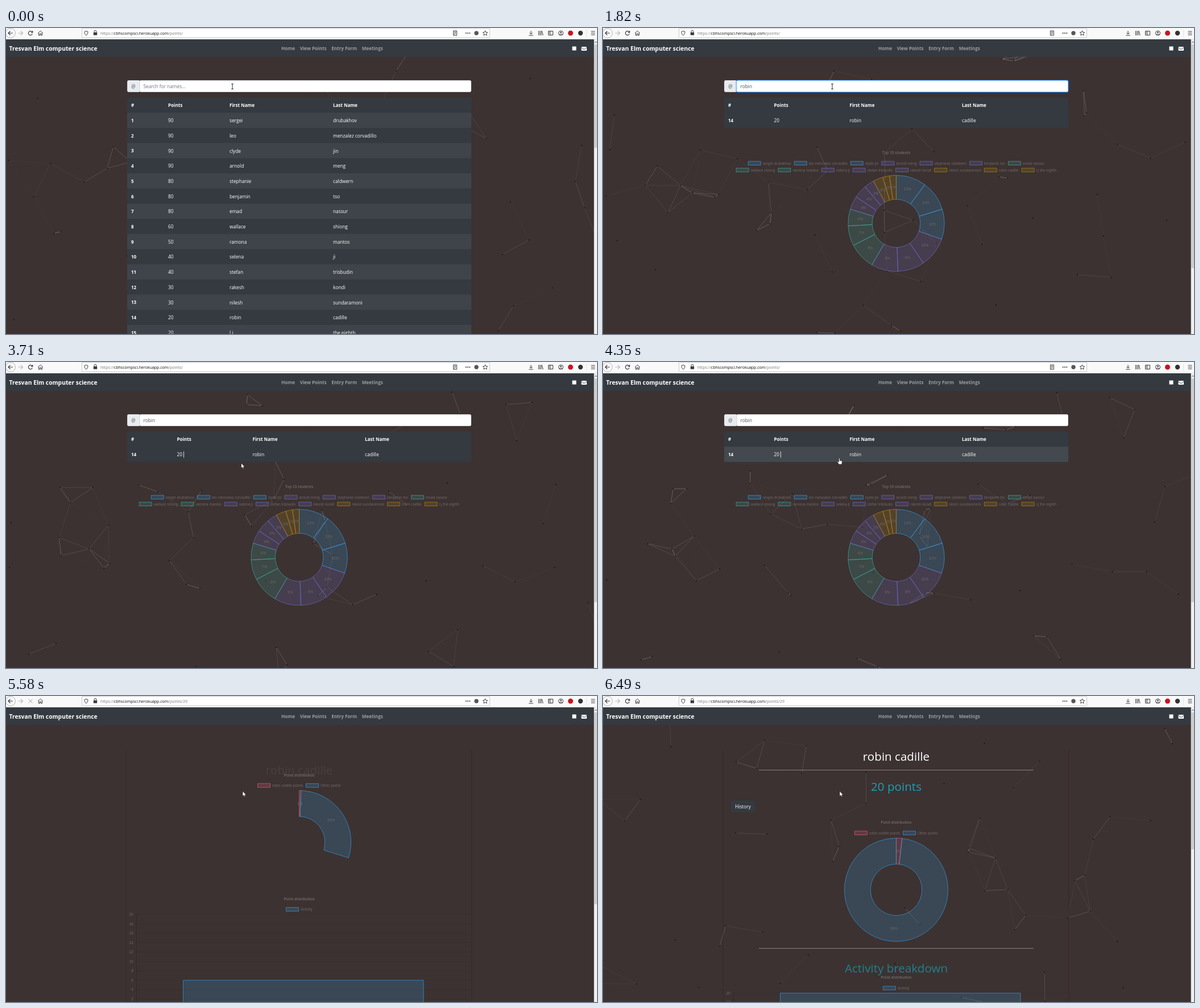
These frames come from a looping animation (1039 by 539 pixels, 6530 ms). An HTML page with a canvas:

```html
<!DOCTYPE html>
<html lang="en">
<head>
<meta charset="utf-8">
<title>Points</title>
<style>
html, body { margin: 0; width: 100%; height: 100%; overflow: hidden; background: #3c3231; }
canvas { display: block; }
</style>
</head>
<body>
<canvas id="stage" width="1039" height="539"></canvas>
<script>
const c = document.getElementById('stage').getContext('2d');
const LOOP = 6530, TYPE = 1110, KEY_GAP = 155, BLUR = 3400, CLICK = 5200, LOAD = 5470;
const UI = '"Open Sans", "Noto Sans", sans-serif', CHART = '"Liberation Sans", Arial, sans-serif';
const DARK = '#343a40', GREY = '#6b6664', INK = '#3a3a3d';
const BLUE = '54,155,225', PURPLE = '110,105,195', GREEN = '60,165,155', GOLD = '175,130,20', PINK = '230,90,120';

const people = `90 sergei drubakhov
90 leo menzalez corvadillo
90 clyde jin
90 arnold meng
80 stephanie caldwern
80 benjamin tso
80 emad nassur
60 wallace shiong
50 ramona mantos
40 selena ji
40 stefan trisbudin
30 rakesh kondi
30 nilesh sundaramoni
20 robin cadille
20 l.j the eighth`.split('\n').map((row, i) => {
  const [points, first, ...rest] = row.split(' ');
  return { id: i + 1, points: +points, first, last: rest.join(' ') };
});
const total = people.reduce((sum, p) => sum + p.points, 0);
const groups = [BLUE, PURPLE, GREEN, PURPLE, GOLD];
const shares = people.map((p, i) => [`${p.first} ${p.last}`, groups[Math.floor(i / 3)], p.points / total]);

const clamp = v => Math.max(0, Math.min(1, v));
const smooth = v => (v = clamp(v), v * v * (3 - 2 * v));
const mod = (a, n) => (a % n + n) % n;

// Drifting dots: start and speed in px per second
function scatter(count, seed) {
  const rand = () => (seed = seed * 16807 % 2147483647) / 2147483647;
  return Array.from({ length: count }, () => ({
    x: rand() * 1080, y: rand() * 535, vx: rand() * 90 - 45, vy: rand() * 90 - 45
  }));
}
const homeDots = scatter(68, 4021), profileDots = scatter(60, 917);

function rect(x, y, w, h, fill, stroke, r = 0) {
  c.beginPath();
  c.roundRect(x, y, w, h, r);
  if (fill) { c.fillStyle = fill; c.fill(); }
  if (stroke) { c.strokeStyle = stroke; c.stroke(); }
}
function disc(x, y, r, fill) {
  c.beginPath();
  c.arc(x, y, r, 0, 7);
  c.fillStyle = fill;
  c.fill();
}
function text(s, x, y, size, fill, { align = 'left', bold = false, font = UI } = {}) {
  c.font = `${bold ? 'bold ' : ''}${size}px ${font}`;
  c.textAlign = align;
  c.fillStyle = fill;
  c.fillText(s, x, y + size * 0.36);
  return c.measureText(s).width;
}
const label = (s, x, y, align = 'center', bold = false) => text(s, x, y, 6.54, GREY, { align, bold, font: CHART });
function icon(d, x, y, stroke = INK, width = 1, fill) {
  const path = new Path2D(d);
  c.save();
  c.translate(x, y);
  if (fill) { c.fillStyle = fill; c.fill(path); }
  c.strokeStyle = stroke;
  c.lineWidth = width;
  c.stroke(path);
  c.restore();
}

function web(dots, t) {
  const pts = dots.map(d => [mod(d.x + d.vx * t / 1000, 1080) - 20, mod(d.y + d.vy * t / 1000, 535) + 25]);
  c.lineWidth = 0.7;
  pts.forEach(([x, y], i) => {
    for (const [u, v] of pts.slice(i + 1)) {
      const d = Math.hypot(x - u, y - v);
      if (d > 82) continue;
      c.strokeStyle = `rgba(255,255,255,${0.45 * (1 - d / 82)})`;
      c.beginPath();
      c.moveTo(x, y);
      c.lineTo(u, v);
      c.stroke();
    }
  });
  for (const [x, y] of pts) disc(x, y, 1.2, 'rgba(25,20,20,.8)');
  c.lineWidth = 1;
}

function legend(items, y) {
  c.font = `6.54px ${CHART}`;
  const widths = items.map(([s]) => 25.5 + c.measureText(s).width);
  let x = 515.5 - (widths.reduce((a, b) => a + b, 0) + 5.5 * (items.length - 1)) / 2;
  items.forEach(([s, rgb], i) => {
    rect(x, y - 3.3, 22, 6.6, `rgba(${rgb},.2)`, `rgba(${rgb},.7)`);
    label(s, x + 25.5, y, 'left');
    x += widths[i] + 5.5;
  });
}

function ring(y, R, r, items, grow = 1) {
  const x = 515.5;
  let a = -Math.PI / 2;
  for (const [, rgb, part] of items) {
    const b = a + part * grow * 2 * Math.PI, m = (a + b) / 2;
    c.beginPath();
    c.arc(x, y, R, a, b);
    c.arc(x, y, r, b, a, true);
    c.closePath();
    c.fillStyle = `rgba(${rgb},.2)`;
    c.fill();
    c.strokeStyle = `rgba(${rgb},.7)`;
    c.stroke();
    label(Math.round(part * grow * 100) + '%', x + (R + r) / 2 * Math.cos(m), y + (R + r) / 2 * Math.sin(m));
    a = b;
  }
}

const typedAt = t => 'robin'.slice(0, Math.max(0, Math.ceil((t - TYPE) / KEY_GAP)));

function search(t) {
  const typed = typedAt(t), focus = clamp((t - 700) / 150) * clamp((BLUR + 150 - t) / 150);
  rect(213.5, 92.5, 22, 20, '#e9ecef', '#ced4da', 2);
  text('@', 224, 103, 8.3, '#495057', { align: 'center' });
  if (focus) rect(234, 91.6, 584.5, 21.8, null, `rgba(0,123,255,${0.6 * focus})`, 2);
  rect(235, 92.5, 582.5, 20, '#fff', focus > 0.5 ? '#80bdff' : '#ced4da', 2);
  const w = text(typed || 'Search for names...', 241.5, 103, 8.3, typed ? '#495057' : '#6c757d');
  if (focus && t < 2400 && mod(t - 1100, 1060) < 530) rect(242 + (typed ? w : 0), 98, 0.8, 10, '#333');
}

function home(t, mouse) {
  web(homeDots, t);
  search(t);
  const query = typedAt(t - 80);
  const rows = people.filter(p => `${p.first} ${p.last}`.includes(query));
  const cols = rows.length > 1 ? [220, 285, 393, 575] : [220, 300.5, 433.5, 631];
  const H = 26.7, top = 122.5;
  rect(213, top, 605, H * (rows.length + 1), DARK);
  ['#', 'Points', 'First Name', 'Last Name'].forEach((s, i) => text(s, cols[i], 136, 8, '#fff', { bold: true }));
  rows.forEach((p, i) => {
    const y = top + H * (i + 1), over = mouse.y > y && mouse.y < y + H;
    if (over || p.id % 2) rect(213, y, 605, H, `rgba(255,255,255,${over ? 0.075 : 0.05})`);
    [p.id, p.points, p.first, p.last].forEach((s, k) => text(s, cols[k], y + 14, k ? 8.3 : 8, '#fff', { bold: !k }));
  });
  if (t > BLUR) rect(312, 157.5, 0.8, 11, '#fff');
  const y = top + H * (rows.length + 1) + 44;
  if (y > 560) return;
  label('Top 15 students', 515.5, y, 'center', true);
  legend(shares.slice(0, 7), y + 18.3);
  legend(shares.slice(7), y + 30.3);
  ring(y + 124.2, 84.6, 42.3, shares);
}

function profile(t) {
  if (t > 5650) web(profileDots, t);
  const grow = 1 - (1 - clamp((t - 5496) / 1000)) ** 4;
  const open = smooth((t - 5560) / 600), open2 = smooth((t - 5800) / 690);
  const rule = y => rect(274, y, 483, 1, 'rgba(255,255,255,.38)');
  const heading = (s, y, fill) => text(s, 515.5, y, 20.6, fill, { align: 'center' });
  rect(210, 96, 2, 443, 'rgba(0,0,0,.1)');
  rect(818, 96, 2, 443, 'rgba(0,0,0,.1)');

  c.globalAlpha = clamp((t - 5550) / 500);
  heading('robin cadille', 131 - 24 * open, '#fff');
  c.globalAlpha = smooth((t - 5650) / 500);
  rule(130);
  heading('20 points', 180 - 20 * open, '#17a2b8');
  rect(225, 184, 42, 21, DARK, null, 2.5);
  text('History', 246, 195, 8.3, '#fff', { align: 'center' });
  rule(360 + 84 * open);
  c.globalAlpha = clamp((t - 5800) / 1000);
  heading('Activity breakdown', 425 + 55 * open2, '#17a2b8');
  c.globalAlpha = 1;

  const y = 139 + 84 * open, parts = [['robin cadille points', PINK, 0.0183], ['Other points', BLUE, 0.9817]];
  label('Point distribution', 515.5, y, 'center', true);
  legend(parts, y + 18.3);
  ring(y + 118.3, 91, 45.3, parts, grow);

  const b = 357 + 84 * open + 55 * open2, base = b + 192.9;
  label('Point distribution', 515.5, b, 'center', true);
  legend([['Activity', BLUE]], b + 18.5);
  for (let v = 0; v <= 20; v += 2) {
    const g = base - v * 8.28;
    label(v, 224, g, 'right');
    rect(225, g, 592, 0.6, 'rgba(0,0,0,.13)');
  }
  rect(229, b + 27, 0.8, 166, 'rgba(0,0,0,.18)');
  const h = 165.6 * grow;
  rect(311.5, base - h, 422.5, h, `rgba(${BLUE},.2)`, `rgba(${BLUE},.7)`);
}

function navbar() {
  rect(0, 20, 1034, 30.7, DARK);
  text('Tresvan Elm computer science', 5.5, 36.5, 10.3, '#fff', { bold: true });
  let x = 484;
  for (const s of ['Home', 'View Points', 'Entry Form', 'Meetings'])
    x += text(s, x, 36.3, 8.1, '#999ca0', { bold: true }) + 8.7;
  rect(995.5, 32.5, 7, 7, '#fff');
  rect(1011.5, 33, 9.5, 7, '#fff', null, 1);
  icon('M0 0L4.7 3.5 9.4 0', 1011.5, 34.3, DARK, 0.9);
}

function browser(t) {
  const loaded = t >= LOAD;
  rect(0, 0, 1039, 20, '#f9f9fa');
  rect(0, 19.4, 1039, 0.6, '#d5d5d8');
  rect(133.5, 0.5, 717, 16.5, '#fff', '#c8c8cc', 1.5);
  icon('M8.5 0A8.5 8.5 0 1 1-8.5 0A8.5 8.5 0 1 1 8.5 0', 8, 9, '#b5b5b8');
  icon('M4 0H-4M-.5-3.5L-4 0-.5 3.5', 8, 9, INK, 1.2);
  icon('M-4 0H4M.5-3.5L4 0 .5 3.5', 25.5, 9, '#b8b8ba', 1.2);
  if (t > CLICK && t < 6050) icon('M-3.5-3.5L3.5 3.5M3.5-3.5L-3.5 3.5', 43, 9, '#a5a5a8');
  else icon('M3.3-1.5A3.6 3.6 0 1 0 3.4 1.4M3.8-4V-1H.8', 43, 9, INK, 1.2);
  icon('M-4.3 0L0-4 4.3 0M-3 -.5V4H-1V1H1V4H3V-.5', 60.5, 9);
  icon('M0-3.7L3-2.6C3 1 1.8 2.8 0 4-1.8 2.8-3 1-3-2.6Z', 141, 9);
  icon('M-2-1V-2.2A2 2 0 0 1 2-2.2V-1', 157, 8.5);
  rect(153.8, 7.6, 6.4, 5, INK);
  let x = 166;
  x += text('https://', x, 9.2, 7, '#77777a');
  x += text('cbhscompsci.herokuapp.com', x, 9.2, 7, '#0c0c0d');
  text('/points/' + (loaded ? '29' : ''), x, 9.2, 7, '#77777a');
  if (!loaded) icon('M-3-4H3V4H-3ZM-1.5-2H1.5M-1.5 0H1.5M-1.5 2H.5', 789.5, 9);
  for (const d of [-3.3, 0, 3.3]) disc(812 + d, 9, 1.1, INK);
  disc(827, 9, 3.7, '#55555a');
  icon('M0-4.2L1.3-1.4 4.2-1.2 2 .9 2.7 3.9 0 2.3-2.7 3.9-2 .9-4.2-1.2-1.3-1.4Z', 842.5, 9);
  icon('M0-4V2M-2.6-.6L0 2 2.6-.6M-3.8 4H3.8', 923, 9);
  icon('M-3.5-4V4M-1.2-4V4M1-4V4M2-3.8L4.2 4', 940, 9);
  icon('M-4-3.5H4V3.5H-4ZM-1-3.5V3.5M-3-1.5H-2M-3 .5H-2', 957.5, 9);
  icon('M4 0A4 4 0 1 1-4 0A4 4 0 1 1 4 0M-2.6 2.7Q0 .6 2.6 2.7', 975.5, 9);
  disc(975.5, 7.8, 1.4, INK);
  disc(992.5, 9, 4.5, '#c8141e');
  disc(1010, 9, 4.2, '#333');
  rect(1020.5, 3, 0.6, 13, '#d5d5d8');
  icon('M-3.5-3H3.5M-3.5 0H3.5M-3.5 3H3.5', 1032, 9);
}

function scrollbar(t) {
  rect(1033.7, 20, 6, 519, '#f0f0f0');
  icon('M-1.8 1L0-1 1.8 1', 1037, 25, '#606060');
  const filtered = t > TYPE + KEY_GAP + 80;
  const end = t >= LOAD ? 367 - 97 * smooth((t - 5560) / 800) : filtered ? 423 : 211;
  rect(1034.3, 29, 5, end - 29, '#cdcdcd');
}

// Each move: start, end, dx, dy
const moves = [[600, 900, 5, 0], [2200, 2600, -1, 14], [2900, 3700, 11.5, 61], [4000, 4500, 2.5, -10.5]];
function mouseAt(t) {
  let x = 398, y = 103;
  for (const [from, to, dx, dy] of moves) {
    const p = smooth((t - from) / (to - from));
    x += dx * p;
    y += dy * p;
  }
  return { x, y };
}
function pointer(t, { x, y }) {
  if (y < 113) icon('M-1.8-4.5H1.8M0-4.5V4.5M-1.8 4.5H1.8', x, y, '#111', 0.9);
  else if (t < LOAD && y > 149 && y < 176)
    icon('M-.9 0Q0-1 .9 0V3.8L4 4.4Q5.2 4.8 5 6.2L4.3 10.5H-.8L-3.4 6.6Q-3.4 5.2-2 5.8L-.9 6.8Z', x, y, '#111', 0.6, '#fff');
  else icon('M0 0V9L2.1 7.2 3.4 10.2 4.8 9.6 3.5 6.7H6.3Z', x, y, '#111', 0.6, '#fff');
}

function draw() {
  const t = performance.now() % LOOP, mouse = mouseAt(t);
  c.lineWidth = 1;
  rect(0, 0, 1039, 539, '#3c3231');
  if (t < LOAD) home(t, mouse);
  else profile(t);
  navbar();
  browser(t);
  scrollbar(t);
  pointer(t, mouse);
  requestAnimationFrame(draw);
}
draw();
</script>
</body>
</html>
```
